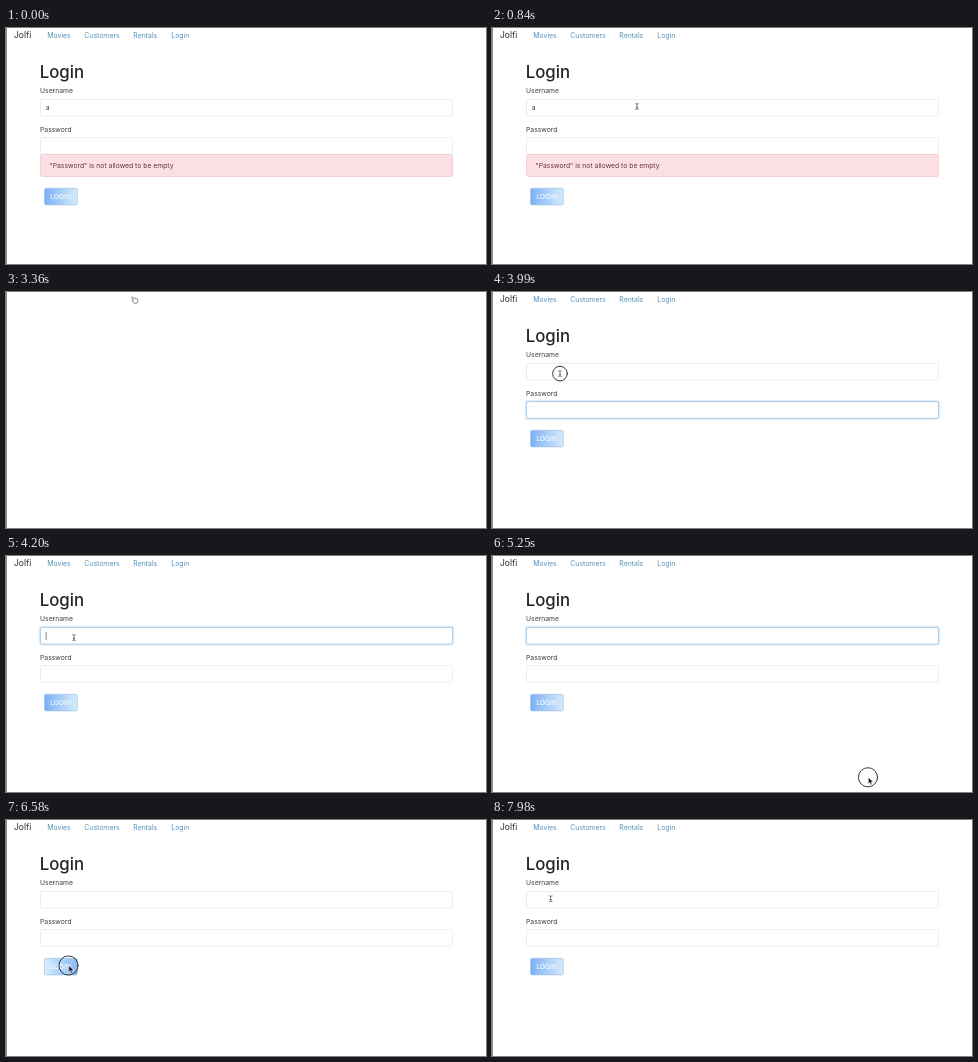
An HTML page that plays this animation: 480x236 px, repeating every 8000 ms.

```html
<!DOCTYPE html>
<html lang="en">
<head>
<meta charset="utf-8">
<title>Login form</title>
<style>
  html, body { margin: 0; height: 100%; overflow: hidden; background: #fff; }
  svg { display: block; width: 100%; height: 100%; }
  text { font: 6.8px Inter, "Open Sans", sans-serif; fill: #3a3e42; }
  .brand { font-size: 8.5px; fill: #25282b; }
  .link { font-size: 6.9px; fill: #5591b8; }
  .title { font-size: 16.8px; font-weight: 500; fill: #212529; }
  .alert { fill: #66373d; }
  .caption { fill: #fff; }
  .field { fill: #fff; stroke: #e9ebed; stroke-width: .9; }
  .halo { fill: none; stroke: #dcebf8; stroke-width: 2.8; }
  .ring { fill: none; stroke: #b0cfea; stroke-width: 1; }
  .caret { fill: #666; }
  .pointer { stroke-linejoin: round; stroke-linecap: round; }
</style>
</head>
<body>
<svg viewBox="0 0 480 236">
  <defs>
    <linearGradient id="sheen" gradientUnits="userSpaceOnUse" x1="38.5" y1="0" x2="104.5" y2="0">
      <stop offset="0" stop-color="#7bb0f6"/>
      <stop offset=".51" stop-color="#d8edfc"/>
      <stop offset="1" stop-color="#7bb0f6"/>
    </linearGradient>
  </defs>
  <rect width="480" height="236" fill="#fff"/>

  <g id="page">
    <text class="brand" x="8" y="9.7">Jolfi</text>
    <text class="link" x="41.3" y="9.5">Movies</text>
    <text class="link" x="78.3" y="9.5">Customers</text>
    <text class="link" x="127.3" y="9.5">Rentals</text>
    <text class="link" x="165.3" y="9.5">Login</text>
    <text class="title" x="33.7" y="49.8">Login</text>

    <text x="34" y="65.4">Username</text>
    <g id="userGlow"><rect class="halo" x="34.2" y="71.2" width="412.6" height="17" rx="2"/></g>
    <rect class="field" x="34.5" y="71.5" width="412" height="16.6" rx="1.8"/>
    <rect class="ring" id="userRing" x="34.5" y="71.5" width="412" height="16.6" rx="1.8"/>
    <text id="typed" x="39.8" y="82.4">a</text>
    <rect class="caret" id="userCaret" x="39.7" y="76" width=".8" height="8"/>

    <text x="34" y="103.5">Password</text>
    <g id="passGlow"><rect class="halo" x="34.2" y="109.4" width="412.6" height="17" rx="2"/></g>
    <rect class="field" x="34.5" y="109.7" width="412" height="16.6" rx="1.8"/>
    <rect class="ring" id="passRing" x="34.5" y="109.7" width="412" height="16.6" rx="1.8"/>
    <rect class="caret" id="passCaret" x="39.7" y="114" width=".8" height="8" opacity=".6"/>

    <g id="alert">
      <rect x="34.5" y="126.5" width="412" height="22" rx="1.8" fill="#fbdfe2" stroke="#f2ccd1" stroke-width=".9"/>
      <text class="alert" x="43.5" y="139.9">"Password" is not allowed to be empty</text>
    </g>

    <g id="button">
      <rect x="38.5" y="138.3" width="32.8" height="16.6" rx="1.6" fill="url(#sheen)" stroke="#a3c3e4" stroke-width=".7"/>
      <text class="caption" x="44.2" y="149.1">LOGIN</text>
    </g>
  </g>

  <rect width="1" height="236" fill="#8a8a8a"/>

  <g id="cursor" class="pointer">
    <circle id="pulse" fill="#fff" fill-opacity=".12" stroke="#222" stroke-width=".9"/>
    <path id="arrow" d="M.4 .2V6.4L1.9 5.1L2.9 7.4L4 6.9L3 4.7H4.9Z" fill="#111" stroke="#fff" stroke-width=".4"/>
    <path id="beam" d="M-1.4-3Q0-3 0-2Q0-3 1.4-3M0-2V2M-1.4 3Q0 3 0 2Q0 3 1.4 3M-.7.8H.7" fill="none" stroke="#444" stroke-width=".65"/>
    <path id="hand" d="M-.8 3.2L-2.6 1L-1.4.6L-3-1.8Q-3-3-2-2.6L-.4-1Q2-1.8 2.9-.5Q3.4 1.2 2.6 2.8L1.6 3.4Z" fill="#fff" stroke="#666" stroke-width=".8"/>
  </g>
</svg>
<script>
const LOOP = 8000, RELOAD = 3360, READY = 3500;
const PULSE = 280, CLICKS = [300, 3640, 3920, 5110, 6440, 6685, 6930];

// time, x, y of the pointer
const PATH = [
  [70, 51, 80], [350, 191, 221], [490, 191, 221], [840, 145, 78.5], [1190, 145, 78.5], [1610, 99, -10],
  [RELOAD - 1, 99, -10], [RELOAD, 128.7, 7.7], [3500, 134, 184], [3640, 110, 118], [3780, 110, 118],
  [3970, 68, 81.6], [4900, 68, 81.6], [5180, 376, 221.3], [5300, 376, 221.3], [5600, 62, 132],
  [5810, 62.5, 145.5], [7270, 62.5, 145.5], [7560, 57, 90], [7910, 57, 90], [7975, 58.7, 78.7], [LOOP, 58.7, 78.7]
];

const el = Object.fromEntries([...document.querySelectorAll("[id]")].map(node => [node.id, node]));
const show = (node, on) => node.setAttribute("visibility", on ? "inherit" : "hidden");
const within = (t, from, to) => t >= from && t < to;
const smooth = k => k * k * (3 - 2 * k);
const ramp = (t, start, length) => smooth(Math.min(1, Math.max(0, (t - start) / length)));
const between = (t, on, off, length) => ramp(t, on, length) - ramp(t, off, length);

function pointerAt(t) {
  const i = Math.max(1, PATH.findIndex(key => key[0] > t));
  const [t0, x0, y0] = PATH[i - 1], [t1, x1, y1] = PATH[i];
  const k = ramp(t, t0, t1 - t0);
  return [x0 + (x1 - x0) * k, y0 + (y1 - y0) * k];
}

function drawPointer(t) {
  const [x, y] = pointerAt(t);
  const overField = x > 34 && x < 447 && (within(y, 71, 88.5) || within(y, 109, 126.5));
  const overLink = y < 12;
  show(el.cursor, t >= 70 && !within(t, 1610, RELOAD));
  el.cursor.setAttribute("transform", `translate(${x} ${y})`);
  show(el.beam, overField);
  show(el.hand, overLink);
  show(el.arrow, !overField && !overLink);

  const click = CLICKS.find(start => within(t, start, start + PULSE));
  show(el.pulse, click !== undefined);
  if (click !== undefined) {
    el.pulse.setAttribute("r", 9.6 - 4.6 * Math.abs((t - click) / PULSE * 2 - 1));
  }
}

function focusField(name, amount) {
  el[name + "Glow"].setAttribute("opacity", amount);
  el[name + "Ring"].setAttribute("opacity", amount);
}

function draw(t) {
  const invalid = t < RELOAD;
  show(el.page, !within(t, RELOAD, READY));
  show(el.alert, invalid);
  show(el.typed, invalid);
  el.button.setAttribute("transform", `translate(0 ${invalid ? 22 : 0})`);

  focusField("pass", between(t, 3650, 4000, 150));
  focusField("user", between(t, 4040, 5255, 150));
  show(el.userCaret, within(t, 4200, 4620));
  show(el.passCaret, within(t, 2030, 2100) || within(t, 3150, RELOAD));

  const hover = between(t, 5700, 7280, 320);
  el.sheen.setAttribute("gradientTransform", `translate(${-33 * hover} 0)`);
  drawPointer(t);
}

function tick() {
  draw(performance.now() % LOOP);
  requestAnimationFrame(tick);
}
tick();
</script>
</body>
</html>
```
